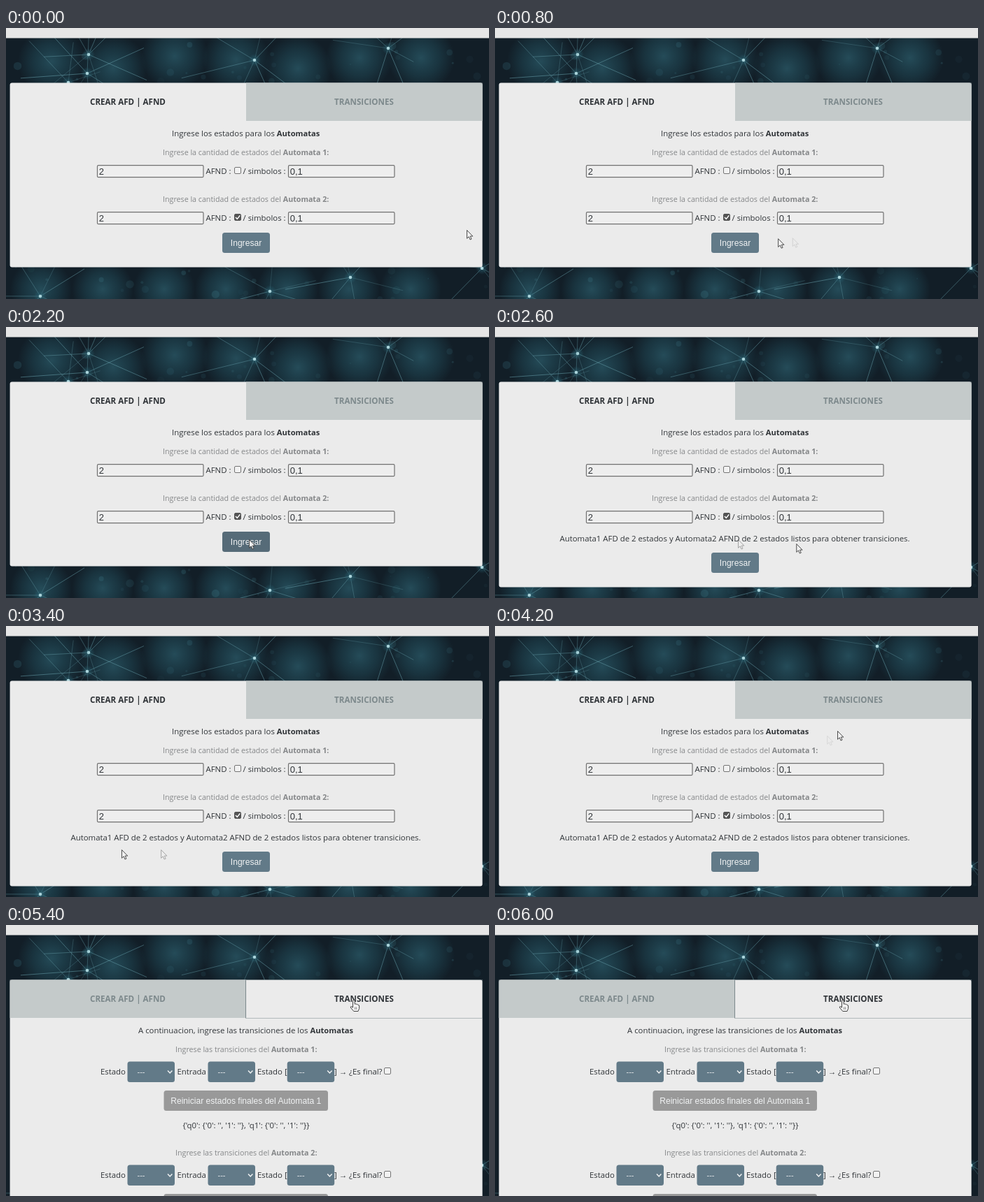
An HTML page for the animation above (6.3 s loop, 690 px wide and 388 px high).

```html
<!DOCTYPE html>
<html lang="es">
<head>
<meta charset="utf-8">
<title>Automatas</title>
<style>
html, body { margin: 0; width: 100%; height: 100%; overflow: hidden; background: #121e27; }
svg { display: block; width: 690px; height: 388px; }
text { font: 11.4px "Open Sans", "Noto Sans", sans-serif; fill: #303438; white-space: pre; }
.bold { font-weight: 700; font-size: .98em; }
.hint { font-size: 10.7px; fill: #858789; }
.hint .bold { font-size: 1em; }
.tab { font-size: 11.6px; font-weight: 700; text-anchor: middle; }
.off { fill: #7d898c; }
.ui { font: 12.1px "Liberation Sans", Arial, sans-serif; }
.value { font-size: 13px; }
.light { fill: #f0f2f3; text-anchor: middle; }
.mid { text-anchor: middle; }
.field { fill: #eee; stroke: #707070; stroke-width: 1.2px; }
.slate { fill: #627a88; }
.slate.hover { fill: #566b78; }
</style>
</head>
<body>
<svg id="stage" viewBox="0 0 690 388"></svg>
<script>
const rect = (x, y, w, h, attrs) => `<rect x="${x}" y="${y}" width="${w}" height="${h}" ${attrs}/>`;
const circle = (x, y, r, attrs) => `<circle cx="${x}" cy="${y}" r="${r}" ${attrs}/>`;
const text = (x, y, cls, str) => `<text x="${x}" y="${y}" class="${cls}">${str}</text>`;
const bold = str => `<tspan class="bold">${str}</tspan>`;
const group = (id, body) => `<g id="${id}">${body}</g>`;

function checkbox(x, y, on) {
  const color = on ? '#545454' : '#f2f2f2';
  const box = rect(x + .5, y + .5, 9, 9, `rx="1.5" fill="${color}" stroke="${on ? color : '#757575'}"`);
  const tick = `<path d="M${x + 2} ${y + 5}l2.3 2.4 4-5" fill="none" stroke="#fff" stroke-width="1.5"/>`;
  return box + (on ? tick : '');
}

const button = (x, y, w, label, attrs) =>
  rect(x, y, w, 29, `rx="3.5" ${attrs}`) + text(x + w / 2, y + 18.5, 'ui light', label);

const input = (x, y, value) =>
  rect(x + .5, y - 8.3, 151.5, 17, 'rx="1.5" class="field"') + text(x + 2.7, y + 4.7, 'ui value', value);

const select = (x, y) => rect(x, y, 67.5, 29.5, 'rx="3.5" class="slate"') +
  text(x + 19.5, y + 18, 'light', '---') +
  `<path d="M${x + 57.5} ${y + 13}l3.2 3.4 3.2-3.4" fill="none" stroke="#f0f2f3" stroke-width="1.5"/>`;

// A plexus: soft light, blurred specks, and hubs with rays
function background() {
  const hubs = [[118, 38], [116, 65], [89, 78], [355, 46], [546, 29], [49, 384], [377, 377], [492, 357], [680, 344]];
  let seed = 11;
  const random = (min, max) => min + (max - min) * (seed = seed * 16807 % 2147483647) / 2147483647;
  let out = rect(0, 0, 690, 388, 'fill="#121e27"');

  for (let i = 0; i < 7; i++) {
    out += circle(65 + i * 88, 48 + 10 * Math.sin(i * 2), 48, 'fill="url(#glow)"') +
      circle(50 + i * 88, 374, 44, 'fill="url(#glow)"');
  }
  for (let i = 0; i < 50; i++) {
    const y = i % 2 ? random(15, 79) : random(343, 388);
    out += circle(random(0, 690), y, random(1, 6), `fill="#4a91a0" opacity="${random(.04, .2)}"`);
  }
  for (const [x, y] of hubs) {
    for (let i = 0; i < 7; i++) {
      const angle = (i + random(0, .8)) * Math.PI * 2 / 7;
      const length = random(40, 110);
      out += `<path d="M${x} ${y}l${length * Math.cos(angle)} ${length * Math.sin(angle)}"
        stroke="#6aa3ae" stroke-width=".9" opacity="${random(.25, .6)}"/>`;
    }
    out += circle(x, y, 9, 'fill="url(#glow)"') + circle(x, y, 2.3, 'fill="#a9d3da"');
  }
  return out + rect(0, 0, 690, 14.5, 'fill="#e6e6e6"');
}

const card = (height, attrs = '') => rect(5.6, 78.6, 675, height, `${attrs} rx="3" fill="#ebebeb"`);

const tabs = active =>
  rect(active ? 5.6 : 343, 78.6, 337.5, 54.4, 'fill="#c4caca"') +
  text(174, 110, active ? 'tab off' : 'tab', 'CREAR AFD | AFND') +
  text(511.5, 110, active ? 'tab' : 'tab off', 'TRANSICIONES');

const stateRow = (n, y, nondeterministic) =>
  text(224, y - 23, 'hint', `Ingrese la cantidad de estados del ${bold(`Automata ${n}:`)}`) +
  input(130, y, '2') +
  text(285.5, y + 4, '', 'AFND :') + checkbox(326, y - 6, nondeterministic) +
  text(338.5, y + 4, '', '/ simbolos :') + input(403, y, '0,1');

const transitionRow = (n, y) =>
  text(242, y - 28, 'hint', `Ingrese las transiciones del ${bold(`Automata ${n}:`)}`) +
  text(135, y + 4, '', 'Estado') + select(173.5, y - 14.5) +
  text(244.5, y + 4, '', 'Entrada') + select(288.5, y - 14.5) +
  text(359, y + 4, '', 'Estado [') + select(401.7, y - 14.5) +
  text(469, y + 4, '', '] → ¿Es final?') + checkbox(540, y - 6) +
  button(225.5, y + 27, 234.5, `Reiniciar estados finales del Automata ${n}`, 'fill="#999"');

const createScreen = () => card(264, 'id="card"') + tabs(0) +
  text(237, 155, '', `Ingrese los estados para los ${bold('Automatas')}`) +
  stateRow(1, 205, false) + stateRow(2, 272, true) +
  group('message', text(342.5, 307, 'mid',
    'Automata1 AFD de 2 estados y Automata2 AFND de 2 estados listos para obtener transiciones.')) +
  group('enter', button(309, 293, 68, 'Ingresar', 'id="enterBox" class="slate"'));

const transitionScreen = () => card(320) + tabs(1) +
  text(189, 155, '', `A continuacion, ingrese las transiciones de los ${bold('Automatas')}`) +
  transitionRow(1, 210) + transitionRow(2, 358) +
  text(343, 291, 'mid', "{'q0': {'0': '', '1': ''}, 'q1': {'0': '', '1': ''}}") +
  rect(342.5, 78.5, 338, 55, 'fill="none" stroke="#76868a" stroke-dasharray="1 1"') +
  rect(342, 79, 1, 54, 'fill="#7d898c"');

const arrow = '<path d="M.5 .5V12.3L3.2 9.8L5 14L7 13.1L5.2 9.1H8.8Z" fill="#f1f1f1" stroke="#3b3b3b" stroke-width=".9"/>';
const hand = '<path d="M-.5 1Q1-.6 2.2 1V6.2L3.5 6Q5 6 5.2 6.8Q6.6 6.3 7 7.5Q8.6 7.4 8.6 9V12.5L7 16.5H.8L-3.8 11Q-3.8 9.4-2.2 9.8L-.5 11.2Z" fill="#f4f4f4" stroke="#333" stroke-width=".9"/>' +
  '<path d="M2.6 10.5v3.5M4.7 10.5v3.5" stroke="#555" stroke-width=".7"/>';

document.getElementById('stage').innerHTML =
  `<defs><radialGradient id="glow"><stop stop-color="#38798a" stop-opacity=".5"/>
  <stop offset=".55" stop-color="#2c6c7d" stop-opacity=".28"/><stop offset="1" stop-color="#2c6c7d" stop-opacity="0"/></radialGradient></defs>` +
  background() + group('create', createScreen()) +
  group('focus', rect(342.5, 78.5, 338, 55, 'fill="none" stroke="#bcc4c4"')) +
  group('transitions', transitionScreen()) +
  group('ghost', arrow) + group('arrow', arrow) + group('hand', hand);

// Times are in steps of 100 ms
const STEP = 100, STEPS = 63;
const READY = 23, PRESSED = 53, SWITCHED = 54;
const start = { x: 658, y: 289 };
const moves = [
  { from: 0, to: 14, x: 347, y: 304 },
  { from: 25, to: 29.7, x: 566, y: 320 },
  { from: 29.7, to: 36, x: 120, y: 320 },
  { from: 37, to: 42, x: 489, y: 150 },
  { from: 44, to: 48, x: 496, y: 107 },
];

function pointer(step) {
  let { x, y } = start;
  for (const move of moves) {
    const t = Math.min(1, Math.max(0, (step - move.from) / (move.to - move.from)));
    const eased = 1 - (1 - t) ** 2;
    x += (move.x - x) * eased;
    y += (move.y - y) * eased;
  }
  return [x, y];
}

const el = id => document.getElementById(id);
const show = (id, on) => el(id).style.display = on ? '' : 'none';
const place = (id, x, y) => el(id).setAttribute('transform', `translate(${x} ${y})`);

function draw(now) {
  const step = Math.floor(now / STEP) % STEPS;
  const ready = step >= READY;
  const [x, y] = pointer(step);
  const [lastX, lastY] = pointer(step - 1);
  const trail = Math.hypot(x - lastX, y - lastY);
  const overTab = y < 133;

  show('create', step < SWITCHED);
  show('focus', step === PRESSED);
  show('transitions', step >= SWITCHED);
  show('message', ready);
  el('card').setAttribute('height', ready ? 294 : 264);
  place('enter', 0, ready ? 30 : 0);
  el('enterBox').classList.toggle('hover', !ready && x < 377);

  show('arrow', !overTab);
  show('hand', overTab);
  place(overTab ? 'hand' : 'arrow', x, y);
  show('ghost', trail > 1 && !overTab);
  el('ghost').setAttribute('opacity', Math.min(.45, trail / 130));
  place('ghost', lastX, lastY);
}

function loop() {
  draw(performance.now());
  requestAnimationFrame(loop);
}
loop();
</script>
</body>
</html>
```
